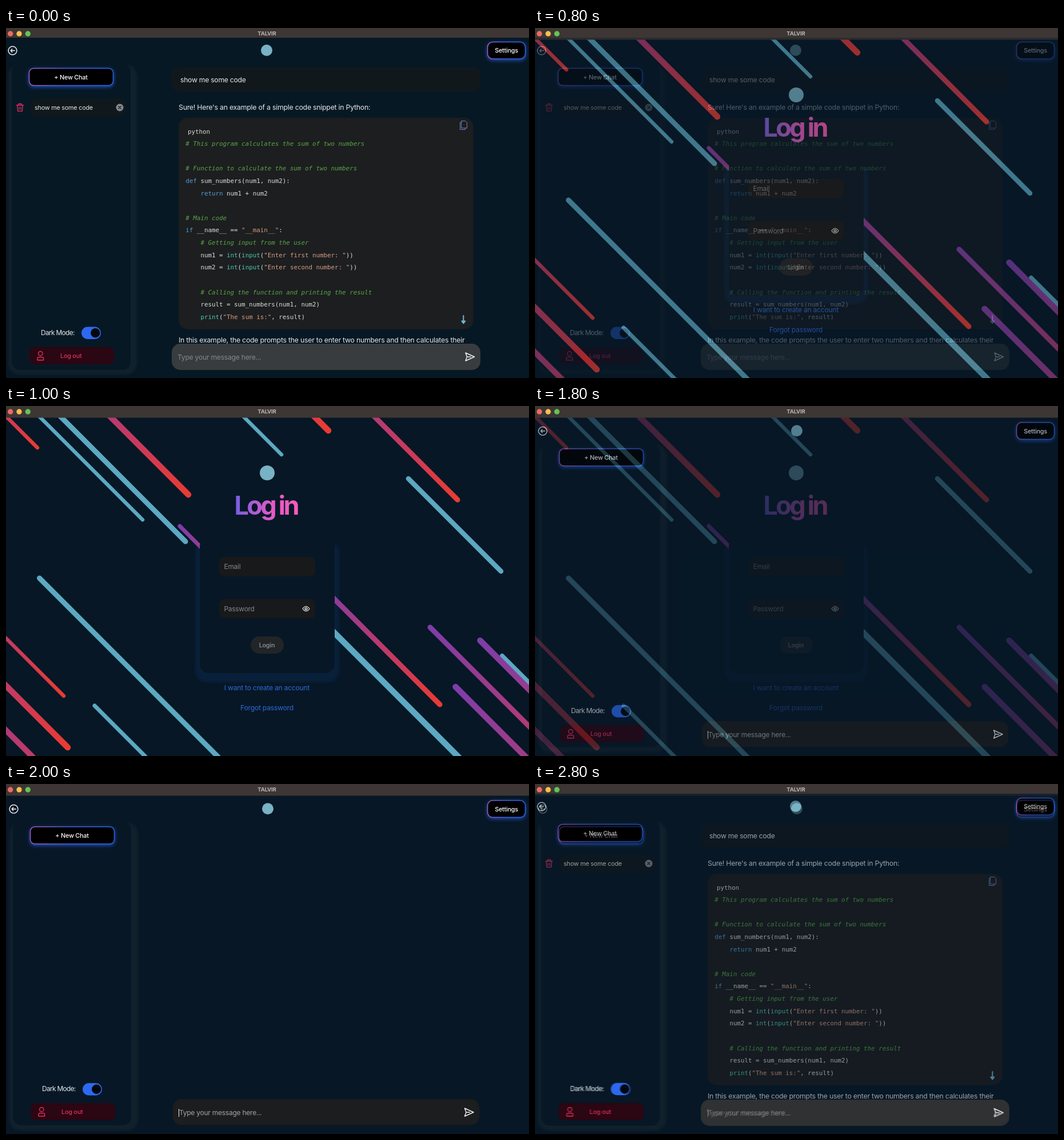
These frames come from a looping animation (915x612 px, 3 s). An HTML page:

```html
<!DOCTYPE html>
<html lang="en">
<head>
<meta charset="utf-8">
<title>Chat app</title>
<style>
  html, body { margin: 0; width: 100%; height: 100%; overflow: hidden; background: #071825; }
  svg { display: block; }
  text { font: 12.15px Inter, sans-serif; letter-spacing: -.02em; fill: #e4e7e9; }
  .label { font-size: 10.8px; font-weight: 500; fill: #fff; }
  .prose { font-size: 12.32px; }
  .mid { text-anchor: middle; }
  .code { font: 10.83px "DejaVu Sans Mono", monospace; letter-spacing: 0; fill: #dcdcdc; }
  .comment { fill: #57a64a; font-style: italic; }
  .keyword { fill: #569cd6; }
  .builtin { fill: #4ec9b0; }
  .string { fill: #d69d85; }
  .hint { fill: #85888a; }
  .link { fill: #2e6ad9; }
  .line { fill: none; stroke: #f2f4f5; stroke-width: 1.4; stroke-linecap: round; stroke-linejoin: round; }
  .red { stroke: #e0305f; }
  .button { stroke: url(#edge); stroke-width: 1.5; filter: drop-shadow(0 2px 3px #1f4fb8); }
  .halo { filter: blur(2px); }
</style>
</head>
<body>
<svg id="stage" width="915" height="612" viewBox="0 0 915 612">
  <defs>
    <linearGradient id="edge">
      <stop stop-color="#a25cc4"/><stop offset=".45" stop-color="#4560d4"/><stop offset="1" stop-color="#2a66e4"/>
    </linearGradient>
    <linearGradient id="heading">
      <stop stop-color="#755fe0"/><stop offset=".6" stop-color="#e45ac6"/><stop offset="1" stop-color="#f85abb"/>
    </linearGradient>
    <linearGradient id="hot" x2="1" y2="1">
      <stop stop-color="#7d3da9"/><stop offset=".5" stop-color="#b93a6e"/><stop offset="1" stop-color="#ea3b32"/>
    </linearGradient>
    <linearGradient id="copy" x2="1" y2="1">
      <stop stop-color="#4a93c4"/><stop offset="1" stop-color="#8d74c0"/>
    </linearGradient>
  </defs>
</svg>
<script>
const TEAL = '#071825', NAVY = '#071726', CYAN = '#5ca9c1';

const rect = (x, y, w, h, r, fill, cls = '') =>
  `<rect x="${x}" y="${y}" width="${w}" height="${h}" rx="${r}" fill="${fill}" class="${cls}"/>`;
const circle = (x, y, r, fill, cls = '') =>
  `<circle cx="${x}" cy="${y}" r="${r}" fill="${fill}" class="${cls}"/>`;
const text = (x, y, s, cls = '', style = '') =>
  `<text x="${x}" y="${y}" class="${cls}" style="${style}">${s}</text>`;
const line = (d, cls = '', style = '') => `<path d="${d}" class="line ${cls}" style="${style}"/>`;
const shift = (x, y, s) => `<g transform="translate(${x} ${y})">${s}</g>`;
const scene = (id, fill, barHeight, s) =>
  `<g id="${id}">${rect(0, 0, 915, 612, 0, fill)}${s}${rect(0, 0, 915, barHeight, 0, '#3d3634')}</g>`;

const send = (x, y) => shift(x, y, line('M-7 -7L8.5 0L-7 7L-4.5 0ZM-4.5 0H2'));

// Sidebar and header shared by both chat views.
const shell = (dx, dy, fill) =>
  rect(4 + dx, 64 + dy, 225, 542 - dy, 20, '#11212c', 'halo') +
  rect(10 + dx, 62 + dy, 208 - dx / 2, 536 - dy * 1.3, 14, fill) +
  shift(dx, dy,
    line('M11.5 32.2a7.3 7.3 0 1 0 .01 0ZM15.3 39.5H8.2M10.8 36.8L8.2 39.5L10.8 42.2') +
    circle(456, 39, 10, '#79b2c4') +
    rect(40.5, 70.5, 147, 30, 8, '#000', 'button') +
    text(113.5, 89.5, '+ New Chat', 'label mid')) +
  shift(0, dy,
    rect(842.5, 24.5, 66, 29.5, 9, '#000', 'button') +
    text(875.5, 43.3, 'Settings', 'label mid')) +
  shift(dx, dy / 9,
    text(61, 536.8, 'Dark Mode:', '', 'font-size:11.9px;letter-spacing:-.055em') +
    rect(132, 522.5, 34, 21.5, 10.75, '#2d69ee') +
    circle(156.3, 533.3, 8.2, '#04080e')) +
  shift(dx, 0,
    rect(41, 558, 148, 30, 8, '#2b0613') +
    circle(60.3, 569.2, 3.7, 'none', 'line red') +
    line('M57.5 575.5h5.6q2.6 0 2.6 3v2.3h-10.8v-2.3q0 -3 2.6 -3Z', 'red') +
    text(95, 577.3, 'Log out', 'label', 'fill:#e0305f'));

const source = `# This program calculates the sum of two numbers

# Function to calculate the sum of two numbers
def sum_numbers(num1, num2):
    return num1 + num2

# Main code
if __name__ == "__main__":
    # Getting input from the user
    num1 = int(input("Enter first number: "))
    num2 = int(input("Enter second number: "))

    # Calling the function and printing the result
    result = sum_numbers(num1, num2)
    print("The sum is:", result)`;

const token = /(?<comment>#.*)|(?<string>"[^"]*")|\b(?:(?<keyword>def|return|if)|(?<builtin>int|input|print))\b/g;
const paint = s => s.replace(token, (m, ...rest) => {
  const groups = rest.at(-1);
  return `<tspan class="${Object.keys(groups).find(k => groups[k])}">${m}</tspan>`;
});
const code = source.split('\n').map((s, i) =>
  text(314.3 + s.search(/\S|$/) * 6.52, 206 + i * 21.63, paint(s.trim()), 'code')).join('');

const chat = shell(0, 0, TEAL) +
  rect(43, 124, 166, 30, 9, '#11181c') +
  line('M18.5 135h12M22 135v-2.5h5v2.5M19.8 135l.8 10.3h7.8l.8 -10.3M23 138.5v4M26 138.5v4', 'red', 'stroke-width:1.3') +
  text(50, 143.4, 'show me some code', '', 'font-size:10.8px') +
  circle(199, 139, 6.5, '#7f898f') +
  line('M197 137l4 4M201 137l-4 4', '', 'stroke:#11181c') +
  rect(290, 69, 540, 42, 14, '#11181c') +
  text(305, 94.5, 'show me some code') +
  text(302, 142.8, "Sure! Here's an example of a simple code snippet in Python:", 'prose') +
  rect(302, 157, 515.5, 369.5, 16, '#1d1e1f') +
  text(318, 184.6, 'python', 'code') + code +
  line('M797 162.5h6.5l3 3v9.5h-9.5ZM797 165h-2.5v12.5h9v-2.5', '', 'stroke:url(#copy);stroke-width:1') +
  line('M800.3 503V515M797.3 512.5l3 4l3 -4Z', '', 'stroke:#70b4d2;stroke-width:2') +
  text(302, 550.3, 'In this example, the code prompts the user to enter two numbers and then calculates their', 'prose') +
  rect(290, 552, 540, 46, 15, '#393c3e') +
  text(300, 580.4, 'Type your message here...', 'hint') +
  send(811, 575);

const home = shell(2, 4.3, NAVY) +
  rect(292, 551, 536, 45.5, 15, '#1c1d1e') +
  line('M302.5 568.5v13', '', 'stroke-width:1') +
  text(303, 579, 'Type your message here...', '', 'fill:#a2a4a5;font-size:12px') +
  send(809.5, 574);

// Diagonal bars: start x, start y, run, width.
const bars = (list, stroke) => list.map(([x, y, run, w]) =>
  line(`M${x} ${y}l${run} ${run}`, '', `stroke:${stroke};stroke-width:${w}`)).join('');
const cool = [[50, 10, 189, 6.5], [87, 10, 227, 9], [407, 10, 75, 6.5], [704, 127, 162, 8.5],
  [58.5, 301, 330, 9], [155, 524, 110, 7], [550, 372, 260, 10.5], [868, 437, 80, 8]];
const hot = [[-145, -127, 200, 6.5], [59, -105, 260, 10.5], [304, -217, 260, 10.5], [530, -96, 260, 9],
  [304, 210, 200, 7], [549, 312, 210, 9], [742, 387, 400, 9], [829.5, 410, 400, 10.5],
  [786.5, 491, 400, 10.5], [-159, 247, 260, 6.5], [-152, 337, 260, 10.5], [-150, 417, 350, 10]];

const field = (y, label) => rect(373, y, 168, 34, 9, '#17191b') + text(381.5, y + 21, label, 'hint', 'font-size:11.9px');
const login =
  rect(331, 237, 252, 246, 20, '#09203a', 'halo') +
  bars(cool, CYAN) + bars(hot, 'url(#hot)') +
  rect(339, 230, 236, 237, 16, NAVY) +
  circle(457, 117, 13, '#79b2c4') +
  text(399.5, 190, 'Log in', '', 'font-size:45px;font-weight:700;letter-spacing:-.082em;fill:url(#heading)') +
  field(264, 'Email') + field(337.5, 'Password') +
  line('M519 354.5q6 -8.5 12 0q-6 8.5 -12 0Z', '', 'stroke-width:1.2') +
  circle(525, 354.5, 1.9, 'none', 'line') +
  rect(428, 403, 58, 30, 15, '#222528') +
  text(456.5, 421.9, 'Login', 'mid hint', 'font-size:10.7px;font-weight:600') +
  text(456.5, 496.7, 'I want to create an account', 'mid link') +
  text(456.5, 531.6, 'Forgot password', 'mid link');

const windowTitle = ['#ee6a5f', '#f5bf4f', '#61c554'].map((c, i) => circle(7.7 + i * 15.3, 10, 4.7, c)).join('') +
  text(456.5, 13.2, 'TALVIR', 'mid', 'font-size:9.6px;font-weight:700;fill:#b9b4b2');

const stage = document.getElementById('stage');
stage.insertAdjacentHTML('beforeend',
  scene('chat', TEAL, 17, chat) + scene('login', NAVY, 20.5, login) + scene('home', NAVY, 20.5, home) + windowTitle);
const [loginView, homeView] = ['login', 'home'].map(id => document.getElementById(id));

// Each view holds for 600 ms, then dissolves into the next in two 200 ms steps.
const clamp = v => Math.min(1, Math.max(0, v));
const start = performance.now();
function draw() {
  const step = Math.floor((performance.now() - start) % 3000 / 200);
  loginView.style.opacity = step < 10 ? clamp((step - 2) / 3) : 0;
  homeView.style.opacity = clamp(Math.min(step - 7, 15 - step) / 3);
  requestAnimationFrame(draw);
}
draw();
</script>
</body>
</html>
```
